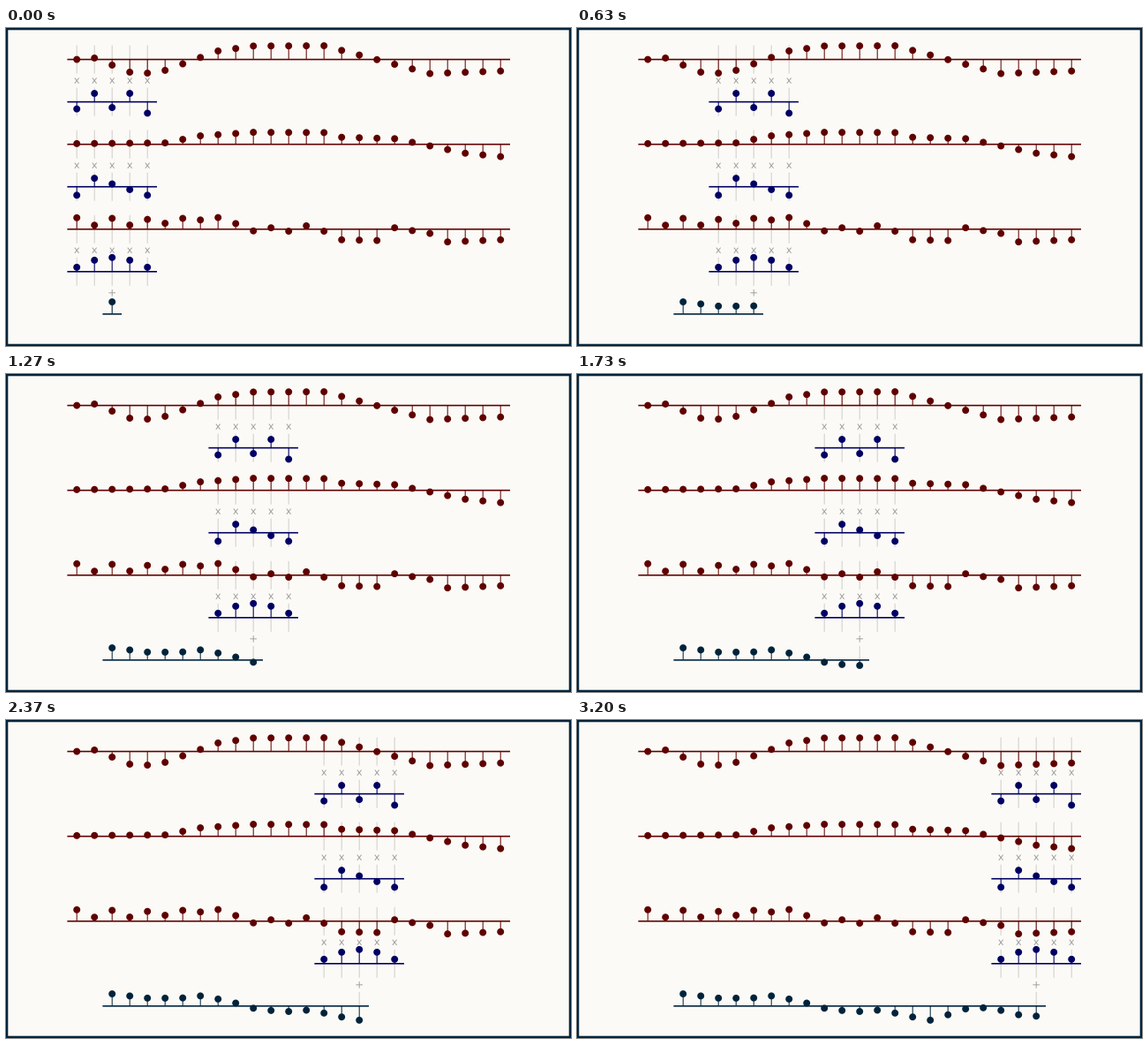
Write a matplotlib script that moves like this. It is 640x360 px and loops after 3360 ms.

```python
import matplotlib.pyplot as plt
import numpy as np
from matplotlib.animation import FuncAnimation
from matplotlib.collections import LineCollection
from matplotlib.patches import Rectangle

W, H, DPI = 640, 360, 80
PX = 72 / DPI                    # one pixel in points
LOOP, TICK = 3360, 10            # ms
LEFT, TOP, STEP, UNIT, ROW = 80.2, 35.6, 20, 16, 48.04
SAMPLES, TAPS = 25, 5
BORDER = 2.3

PAPER, RED, BLUE, INK = "#fbfaf6", "#5f0000", "#000064", "#00233b"
GUIDE, SIGN = "#cfcecb", "#9a9a98"


def trace(*points):
    """Samples of a line through a few (index, height) points."""
    return np.interp(np.arange(SAMPLES), *zip(*points))


i = np.arange(SAMPLES)
ripple = 0.26 * np.cos(np.pi * i) * np.cos(np.pi * i / 17) * (i < 15)
signals = [
    trace((0, 0), (1, 0.1), (3, -0.9), (4.5, -1), (8, 0.6), (10, 0.95),
          (14, 0.97), (20, -1), (24, -0.82)),
    trace((0, 0.05), (5, 0.1), (7, 0.6), (10, 0.85), (14, 0.83), (15, 0.5),
          (18, 0.4), (22, -0.63), (24, -0.87)),
    ripple + trace((0, 0.55), (4, 0.5), (8, 0.8), (10, -0.05), (14, 0.08),
                   (15, -0.75), (17, -0.8), (18, 0.1), (20, -0.3),
                   (21, -0.9), (24, -0.75)),
]
kernels = [
    np.array([-0.5, 0.6, -0.4, 0.6, -0.8]),
    np.array([-0.6, 0.6, 0.2, -0.2, -0.6]),
    np.cos(np.pi / 5 * np.arange(-2, 3)),
]
result = sum(np.correlate(s, k, "valid") for s, k in zip(signals, kernels))
result /= abs(result).max()

fig = plt.figure(figsize=(W / DPI, H / DPI), dpi=DPI, facecolor=INK)
ax = fig.add_axes([0, 0, 1, 1])
ax.set_xlim(0, W)
ax.set_ylim(H, 0)
ax.axis("off")
ax.add_patch(Rectangle((BORDER, BORDER), W - 2 * BORDER, H - 2 * BORDER,
                       color=PAPER, lw=0, zorder=0, snap=False))


def strokes(color, width, z, cap="butt"):
    lines = LineCollection([], colors=color, linewidths=width * PX, zorder=z,
                           capstyle=cap, snap=False)
    return ax.add_collection(lines, autolim=False)


class Stems:
    """A baseline with thin stems and round heads."""

    def __init__(self, row, color, z):
        self.base = TOP + ROW * row
        self.sticks = strokes(color, 1, z)
        self.axis = strokes(color, 1.6, z + 0.1, "projecting")
        self.heads = strokes(color, 8, z + 0.2, "round")

    def show(self, start, heights):
        base = self.base
        x = LEFT + STEP * (start + np.arange(len(heights)))
        tops = list(zip(x, base - UNIT * np.asarray(heights)))
        self.sticks.set_segments([[(a, base), (a, b)] for a, b in tops])
        self.axis.set_segments([[(x[0] - STEP / 2, base), (x[-1] + STEP / 2, base)]])
        # Very short round-capped strokes make the dots
        self.heads.set_segments([[(a - 0.01, b), (a + 0.01, b)] for a, b in tops])


for n, signal in enumerate(signals):
    Stems(2 * n, RED, 3).show(0, signal)
kernel_stems = [Stems(2 * n + 1, BLUE, 4) for n in range(3)]
output = Stems(6, INK, 4)
guides = strokes(GUIDE, 1, 1)
signs = strokes(SIGN, 0.9, 2)


def position(ms):
    """Kernel shift: one step per 160 ms, held to a 30 per second clock."""
    tick = int((ms + 4) * 30 / 1000)
    return min(int((tick + 0.5) / 4.8), len(result) - 1)


def update(frame):
    pos = position(frame * TICK)
    lines, marks = [], []
    for stems, kernel in zip(kernel_stems, kernels):
        stems.show(pos, kernel)
        y = stems.base - ROW / 2
        for x in LEFT + STEP * (pos + np.arange(TAPS)):
            lines += [[(x, y - 40), (x, y - 8)], [(x, y + 8), (x, y + 40)]]
            marks += [[(x - 2.4, y - 3.1), (x + 2.4, y + 3.1)],
                      [(x - 2.4, y + 3.1), (x + 2.4, y - 3.1)]]

    output.show(TAPS // 2, result[:pos + 1])
    x, y = LEFT + STEP * (pos + TAPS // 2), output.base - ROW / 2
    lines.append([(x, y + 8), (x, output.base)])
    marks += [[(x - 3.8, y), (x + 3.8, y)], [(x, y - 3.8), (x, y + 3.8)]]
    guides.set_segments(lines)
    signs.set_segments(marks)
    return []


anim = FuncAnimation(fig, update, frames=LOOP // TICK, interval=TICK,
                     init_func=lambda: update(0), repeat=True,
                     repeat_delay=0, cache_frame_data=False)
plt.show()
```
